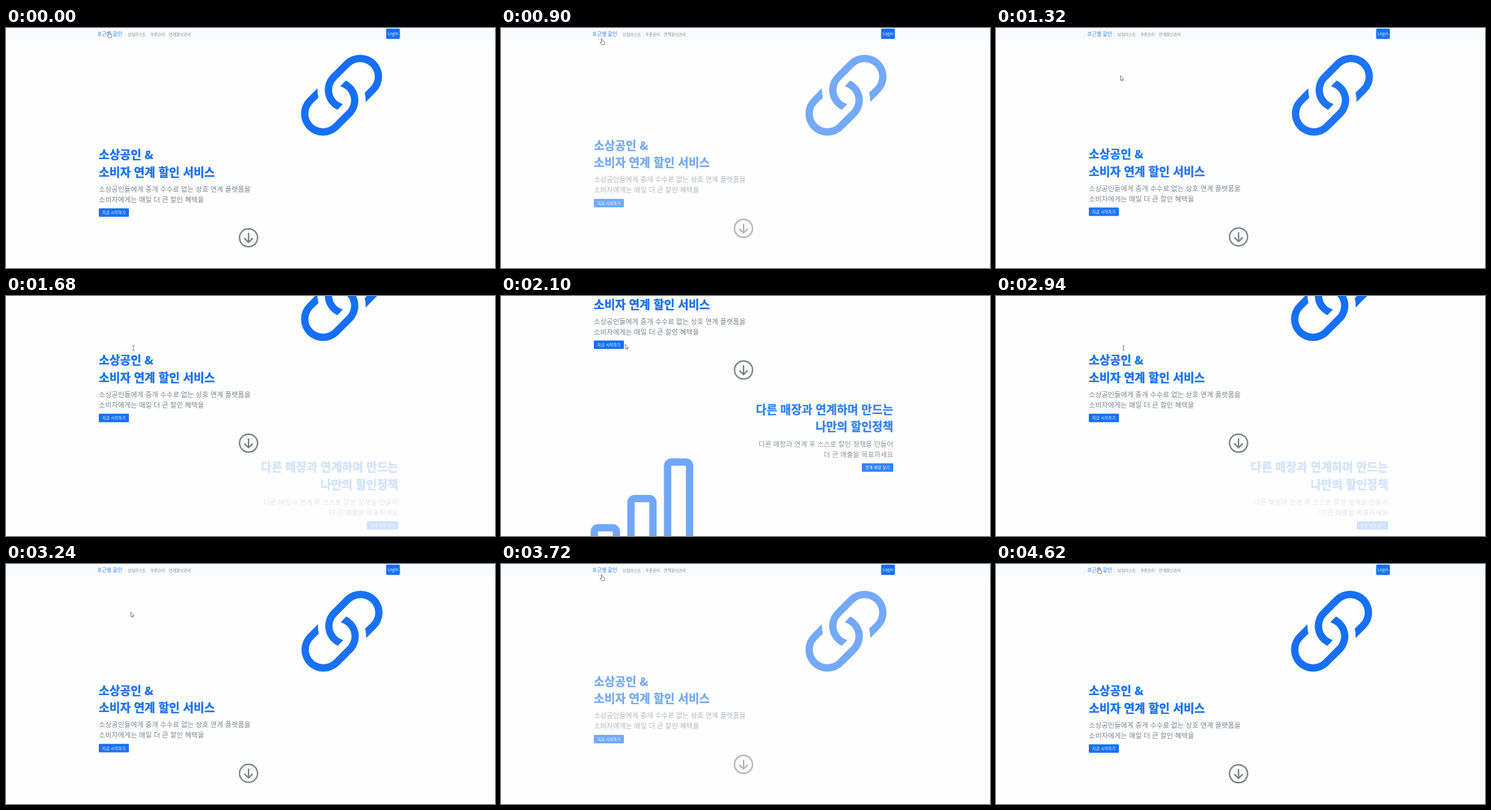
An HTML page for the animation above (4.68 s loop, 748x368 px).

```html
<!DOCTYPE html>
<html lang="ko">
<head>
<meta charset="utf-8">
<title>할인 서비스</title>
<style>
  html, body { margin: 0; width: 100%; height: 100%; overflow: hidden; background: #fefefe; }
  svg { display: block; width: 100%; height: 100%; }
  text { font-family: "Noto Sans CJK KR", "Noto Sans CJK", "Noto Sans", sans-serif; }
  .blue { fill: #156ff8; }
  .title { font-size: 17.7px; font-weight: 700; fill: #156ff8; stroke: #156ff8; stroke-width: .4; }
  .lead { font-size: 10.6px; font-weight: 300; fill: #7f8388; }
  .label { font-size: 6.2px; fill: #fff; text-anchor: middle; }
  .nav { font-size: 6.15px; fill: #86888b; }
  .brand { font-size: 7.85px; font-weight: 300; fill: #3a85f7; }
  .right { text-anchor: end; }
  .line { fill: none; stroke: #777; stroke-width: .9; stroke-linejoin: round; stroke-linecap: round; }
  .paper { fill: #fff; }
</style>
</head>
<body>
<svg viewBox="0 0 748 368">
  <g id="page">
    <rect width="748" height="18.5" fill="#f9fafc"/>
    <text class="brand" x="139.5" y="12">포근별 할인</text>
    <text class="nav" x="186" y="11.5">상점리스트</text>
    <text class="nav" x="220.5" y="11.5">쿠폰관리</text>
    <text class="nav" x="249" y="11.5">연계할인관리</text>
    <rect class="blue" x="581.5" y="1" width="21" height="15.7" rx="1.5"/>
    <text class="label" x="592" y="11.3">Login</text>

    <g id="link">
      <g class="blue" transform="translate(423.7 19) scale(11.2)">
        <path id="half" d="M4.715 6.542 3.343 7.914a3 3 0 1 0 4.243 4.243l1.828-1.829A3 3 0 0 0 8.586 5.5L8 6.086a1 1 0 0 0-.154.199 2 2 0 0 1 .861 3.337L6.88 11.45a2 2 0 1 1-2.83-2.83l.793-.792a4 4 0 0 1-.128-1.286z"/>
        <use href="#half" transform="rotate(180 8 7.5)"/>
      </g>
    </g>

    <g id="hero">
      <text class="title" x="142" y="201.3">소상공인 &amp;</text>
      <text class="title" x="142" y="227.8">소비자 연계 할인 서비스</text>
      <text class="lead" x="142" y="250.9">소상공인들에게 중개 수수료 없는 상호 연계 플랫폼을</text>
      <text class="lead" x="142" y="266.8">소비자에게는 매일 더 큰 할인 혜택을</text>
      <rect class="blue" x="142" y="276.5" width="46" height="13" rx="1.2"/>
      <text class="label" x="165" y="285.4">지금 시작하기</text>
      <g fill="none" stroke="#7c8085" stroke-width="2.2">
        <circle cx="371" cy="321.6" r="13.8"/>
        <path d="M371 315.2v13M365.2 322.9l5.8 5.8 5.8-5.8" stroke-linecap="round" stroke-linejoin="round"/>
      </g>
    </g>

    <g id="policy">
      <text class="title right" x="600" y="393.5">다른 매장과 연계하며 만드는</text>
      <text class="title right" x="600" y="420">나만의 할인정책</text>
      <text class="lead right" x="600" y="444.3">다른 매장과 연계 후 스스로 할인 정책을 만들어</text>
      <text class="lead right" x="600" y="460.2">더 큰 매출을 목표하세요</text>
      <rect class="blue" x="552" y="469.5" width="48" height="13" rx="1.2"/>
      <text class="label" x="576" y="478.4">연계 매장 보기</text>
    </g>

    <g id="bars">
      <g transform="translate(140 446) scale(11.2)" fill="none" stroke="#156ff8">
        <rect x="1.5" y="10.5" width="3" height="4" rx=".5"/>
        <rect x="6.5" y="6.5" width="3" height="8" rx=".5"/>
        <rect x="11.5" y="1.5" width="3" height="13" rx=".5"/>
      </g>
    </g>
  </g>

  <g id="cursor">
    <path id="hand" class="line paper" d="M-1.6 1.2V-4.2q.8-.9 1.6 0V-1l3.2.7q.7.3.6 1.2L3.2 4.4H-1.3L-3.6 1q.6-1 2 .2z"/>
    <path id="arrow" class="line paper" d="M-2-4V3.2L-.4 1.8.8 4.2 1.8 3.7.7 1.4H2.6z"/>
    <path id="beam" class="line" d="M-1.2-3.7H1.2M0-3.7V3.7M-1.2 3.7H1.2"/>
  </g>
</svg>
<script>
const STEP = 60, FRAMES = 78;
const SHIFT = 35, FADE = 1000;
const RELOAD = 480;
const $ = id => document.getElementById(id);

const scrollKeys = [[1380, 0], [1680, 96], [2040, 199], [2340, 245]];
const xKeys = [[420, 158], [900, 155], [1260, 192], [1620, 195], [1740, 195], [2040, 192]];
const yKeys = [[480, 10], [780, 12], [900, 21], [1260, 77], [1680, 80], [2040, 78]];

function track(keys, t) {
  if (t <= keys[0][0]) return keys[0][1];
  for (let i = 1; i < keys.length; i++) {
    const [t0, a] = keys[i - 1], [t1, b] = keys[i];
    if (t <= t1) return a + (b - a) * (t - t0) / (t1 - t0);
  }
  return keys[keys.length - 1][1];
}

// CSS "ease": cubic-bezier(.25, .1, .25, 1)
function ease(p) {
  if (p <= 0) return 0;
  if (p >= 1) return 1;
  const bez = (a, b, u) => 3 * a * u * (1 - u) ** 2 + 3 * b * u * u * (1 - u) + u ** 3;
  let lo = 0, hi = 1;
  for (let i = 0; i < 24; i++) {
    const mid = (lo + hi) / 2;
    if (bez(.25, .25, mid) < p) lo = mid; else hi = mid;
  }
  return bez(.1, 1, lo);
}

const fade = (t, start) => ease((t - start) / FADE);

// Slide in from (dx, dy) while appearing
function reveal(id, k, dx, dy) {
  const rest = SHIFT * (1 - k);
  $(id).setAttribute('transform', `translate(${dx * rest} ${dy * rest})`);
  $(id).setAttribute('opacity', k);
}

function draw(t) {
  const scroll = track(scrollKeys, t);
  $('page').setAttribute('transform', `translate(0 ${-scroll})`);

  const hero = t < RELOAD ? 1 : fade(t, 560);
  reveal('link', hero, 1, 0);
  reveal('hero', hero, 0, -1);
  reveal('policy', fade(t, 1527), 0, -1);
  reveal('bars', fade(t, 1752), -1, 0);

  const overText = scroll > 92 && scroll < 194;
  const shape = t < 960 ? 'hand' : overText ? 'beam' : 'arrow';
  for (const id of ['hand', 'arrow', 'beam'])
    $(id).setAttribute('visibility', id === shape ? 'visible' : 'hidden');
  $('cursor').setAttribute('transform', `translate(${track(xKeys, t)} ${track(yKeys, t)})`);
}

// Plays forwards, then backwards
function tick() {
  const n = Math.floor(performance.now() / STEP) % FRAMES;
  draw(Math.min(n, FRAMES - 1 - n) * STEP);
  requestAnimationFrame(tick);
}
tick();
</script>
</body>
</html>
```
